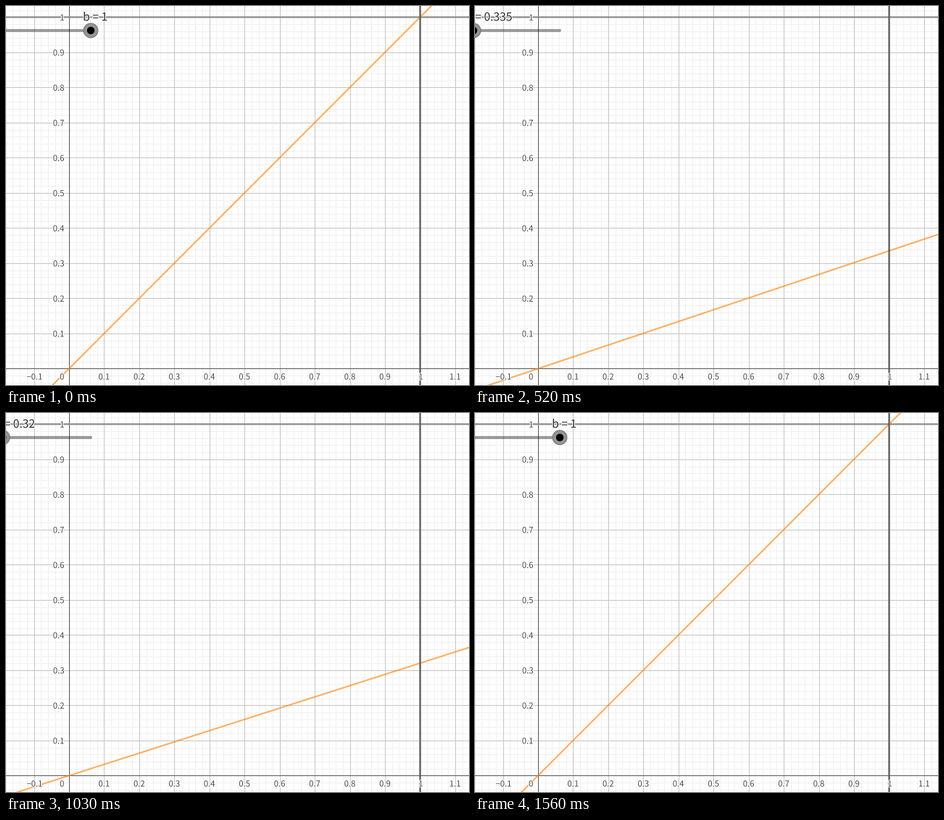
A matplotlib script that plays this animation: 639 by 523 pixels, repeating every 1.66 s.

```python
import numpy as np
import matplotlib.pyplot as plt
from matplotlib.animation import FuncAnimation
from matplotlib.collections import LineCollection
from matplotlib.patches import Circle
from matplotlib.patheffects import withStroke

W, H, DPI = 639, 523, 100
PX = 72 / DPI
X0, Y0, UNIT_X, UNIT_Y = 87.0, 500.4, 484.5, 485.0
LOOP, INTERVAL = 1660, 10
FONT = "Noto Sans CJK JP"

# The slider moves one notch at a time; times in ms at which a notch is reached.
TIMES = [100, 260, 280, 520, 540, 610, 630, 890, 930, 1130,
         1170, 1220, 1260, 1440, 1480, 1560]
NOTCHES = [1, 6, 7, 15, 16, 18, 19, 26, 27, 31,
           32, 34, 35, 41, 42, 45]

fig = plt.figure(figsize=(W / DPI, H / DPI), dpi=DPI, facecolor="white")
ax = fig.add_axes([0, 0, 1, 1])
ax.set_xlim(0, W)
ax.set_ylim(H, 0)
ax.axis("off")


def to_x(x):
    return X0 + UNIT_X * x


def to_y(y):
    return Y0 - UNIT_Y * y


def pixel(v):
    """Centre of the nearest pixel, so thin lines stay crisp without snapping."""
    return np.floor(v + 0.5) + 0.5


def add_grid(ks, step, color, z):
    xs = pixel(to_x(ks * step))
    ys = pixel(to_y(ks * step))
    segs = [[(x, 0), (x, H)] for x in xs if 0 <= x <= W]
    segs += [[(0, y), (W, y)] for y in ys if 0 <= y <= H]
    ax.add_collection(LineCollection(segs, colors=color, linewidths=PX,
                                     zorder=z, snap=False))


def stroke(xs, ys, color, width, z, **kw):
    return ax.plot(xs, ys, color=color, lw=width * PX, zorder=z, snap=False, **kw)[0]


def write(x, y, s, size, color, z, ha="left"):
    return ax.text(x, y, s, fontsize=size * PX, color=color, family=FONT,
                   ha=ha, va="baseline", zorder=z,
                   path_effects=[withStroke(linewidth=2.2 * PX, foreground="white")])


def number(v):
    s = f"{v:.3f}".rstrip("0").rstrip(".")
    return s.replace("-", "\u2212")


add_grid(np.arange(-9, 58), 0.02, "#f0f0f0", 0)
add_grid(np.arange(-1, 12), 0.1, "#c4c4c4", 0.5)
stroke([pixel(X0)] * 2, [0, H], "#555555", 1, 1)
stroke([0, W], [pixel(Y0)] * 2, "#555555", 1, 1)

stroke([0, W], [to_y(1)] * 2, "#8a8a8a", 2.2, 2)
line = stroke([], [], "#ff7f00", 2.1, 2.1, alpha=0.62)
stroke([to_x(1)] * 2, [0, H], "#5a5a5a", 2.2, 2.2)

for k in range(-1, 12):
    tick = number(k / 10)
    if k == 0:
        write(77.3, 515.5, tick, 11.3, "#484848", 3, "center")
        continue
    shift = 1 if k in (-1, 10) else 0
    write(to_x(k / 10) + shift, 515.5, tick, 11.3, "#484848", 3, "center")
    if 0 < k < 11:
        write(80.7, to_y(k / 10) + 4.5, tick, 11.3, "#484848", 3, "right")

stroke([0, 117], [33.8, 33.8], "black", 4, 4, alpha=0.4, solid_capstyle="round")
knob = ax.add_patch(Circle((0, 33.8), 9.9, fc="#959595", ec="#707070",
                           lw=PX, zorder=5))
core = ax.add_patch(Circle((0, 33.8), 5.2, fc="black", ec="none", zorder=6))
label = write(0, 20.3, "", 15.6, "#2a2a2a", 7)


def slope(t):
    n = np.floor(np.interp(t, TIMES, NOTCHES, left=0) + 1e-6)
    falling = 1 - 0.0443 * n
    rising = 0.185 + 0.0448 * (n - 26)
    b = min(1, max(falling, rising))
    return round(b * 200) / 200


def update(i):
    b = slope(i * INTERVAL)
    xs = np.array([-0.3, 1.3])
    line.set_data(to_x(xs), to_y(b * xs))
    x = 117 - 179 * (1 - b)
    knob.center = core.center = (x, 33.8)
    label.set_x(x - 10.8)
    label.set_text(f"b = {number(b)}")
    return line, knob, core, label


anim = FuncAnimation(fig, update, frames=LOOP // INTERVAL, interval=INTERVAL,
                     repeat=True, repeat_delay=0, blit=False)
plt.show()
```
